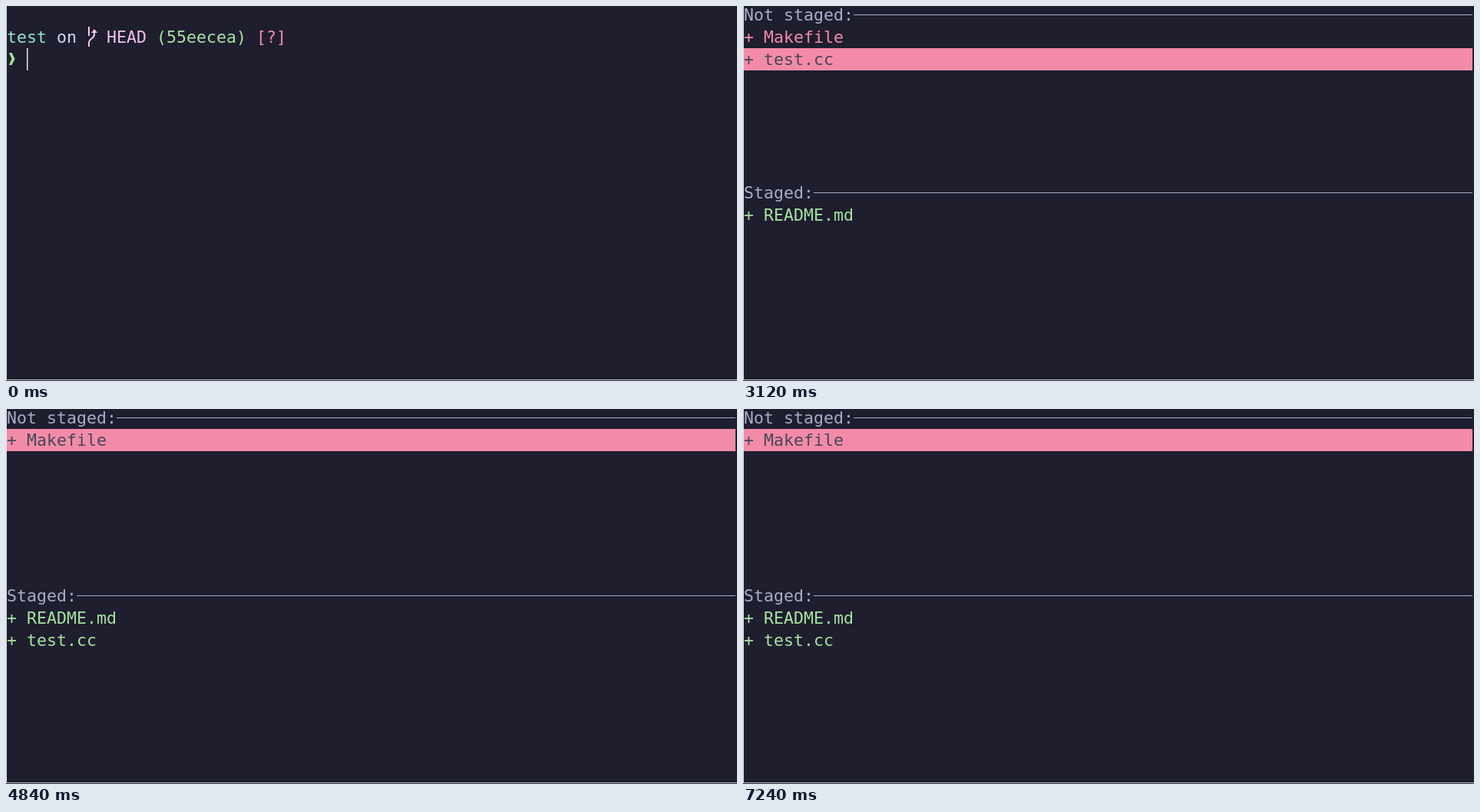
An HTML page with a canvas for the animation above (8000 ms loop, 952 px wide and 489 px high).

```html
<!DOCTYPE html>
<html lang="en">
<head>
<meta charset="utf-8">
<title>Staging files</title>
<style>
  html, body { margin: 0; overflow: hidden; background: #1e1e2e; }
  canvas { display: block; }
</style>
</head>
<body>
<canvas id="stage" width="952" height="489"></canvas>
<script>
const ctx = document.getElementById('stage').getContext('2d');
const DURATION = 8000, CELL = 13, ROW = 29, LEFT = 1, RIGHT = 950;
const BASE = '#1e1e2e', RED = '#f38ba8', GREEN = '#a6e3a1', PINK = '#f5c2e7',
      HEADING = '#a6adc8', DARK = '#45475a', TEXT = '#cdd6f4';
const FILES = ['Makefile', 'README.md', 'test.cc'];

// Start time, indices of staged files, index of the selected file
const STEPS = [
  [1060, [], 0],
  [2920, [], 1],
  [3120, [1], 2],
  [3580, [1, 2], 0],
  [4510, [0, 1, 2], 0],
  [4840, [1, 2], 0],
  [5170, [0, 1, 2], 0],
  [6710, [1, 2], 1],
  [7240, [1, 2], 0],
];

const rowTop = row => row * ROW - 3;

function rect(color, x, y, w, h) {
  ctx.fillStyle = color;
  ctx.fillRect(x, y, w, h);
}

function write(text, col, row, color) {
  ctx.fillStyle = color;
  ctx.fillText(text, LEFT + col * CELL, rowTop(row) + 22);
}

function drawBranch() {
  ctx.strokeStyle = ctx.fillStyle = PINK;
  ctx.lineWidth = 2;
  ctx.stroke(new Path2D('M108 27V39M108 53V48C108 42 115 43 115 37V33'));
  ctx.fill(new Path2D('M111 35L115 30L119 35Z'));
}

function drawPrompt() {
  write('test', 0, 1, '#94e2d5');
  write('on', 5, 1, TEXT);
  drawBranch();
  write('HEAD', 10, 1, PINK);
  write('(55eecea)', 15, 1, GREEN);
  write('[?]', 25, 1, RED);
  ctx.fillStyle = GREEN;
  ctx.fill(new Path2D('M4 61H7.5L11.5 69L7.5 77H4L7.5 69Z'));
  rect('#f5e0dc', 27, 55, 1.5, 29);
}

function drawPane(title, row, files, selected, color) {
  write(title, 0, row, HEADING);
  const lineX = LEFT + title.length * CELL;
  rect(HEADING, lineX, rowTop(row) + 14, RIGHT - lineX, 1);
  files.forEach((file, i) => {
    const line = row + 1 + i, active = file === selected;
    if (active) rect(color, LEFT, rowTop(line), RIGHT - LEFT, ROW);
    write('+ ' + file, 0, line, active ? DARK : color);
  });
}

function draw(now) {
  const time = now % DURATION;
  const step = STEPS.findLast(([start]) => start <= time);
  rect(BASE, 0, 0, 952, 489);
  ctx.font = '21.6px "DejaVu Sans Mono", monospace';
  if (step) {
    const [, staged, selected] = step;
    const pick = inStage => FILES.filter((_, i) => staged.includes(i) === inStage);
    drawPane('Not staged:', 0, pick(false), FILES[selected], RED);
    drawPane('Staged:', 8, pick(true), FILES[selected], GREEN);
  } else {
    drawPrompt();
  }
  rect('#e4e7ee', 0, 0, 1, 488);
  rect('#c3d0d6', 0, 487, 952, 1);
  requestAnimationFrame(draw);
}
requestAnimationFrame(draw);
</script>
</body>
</html>
```
